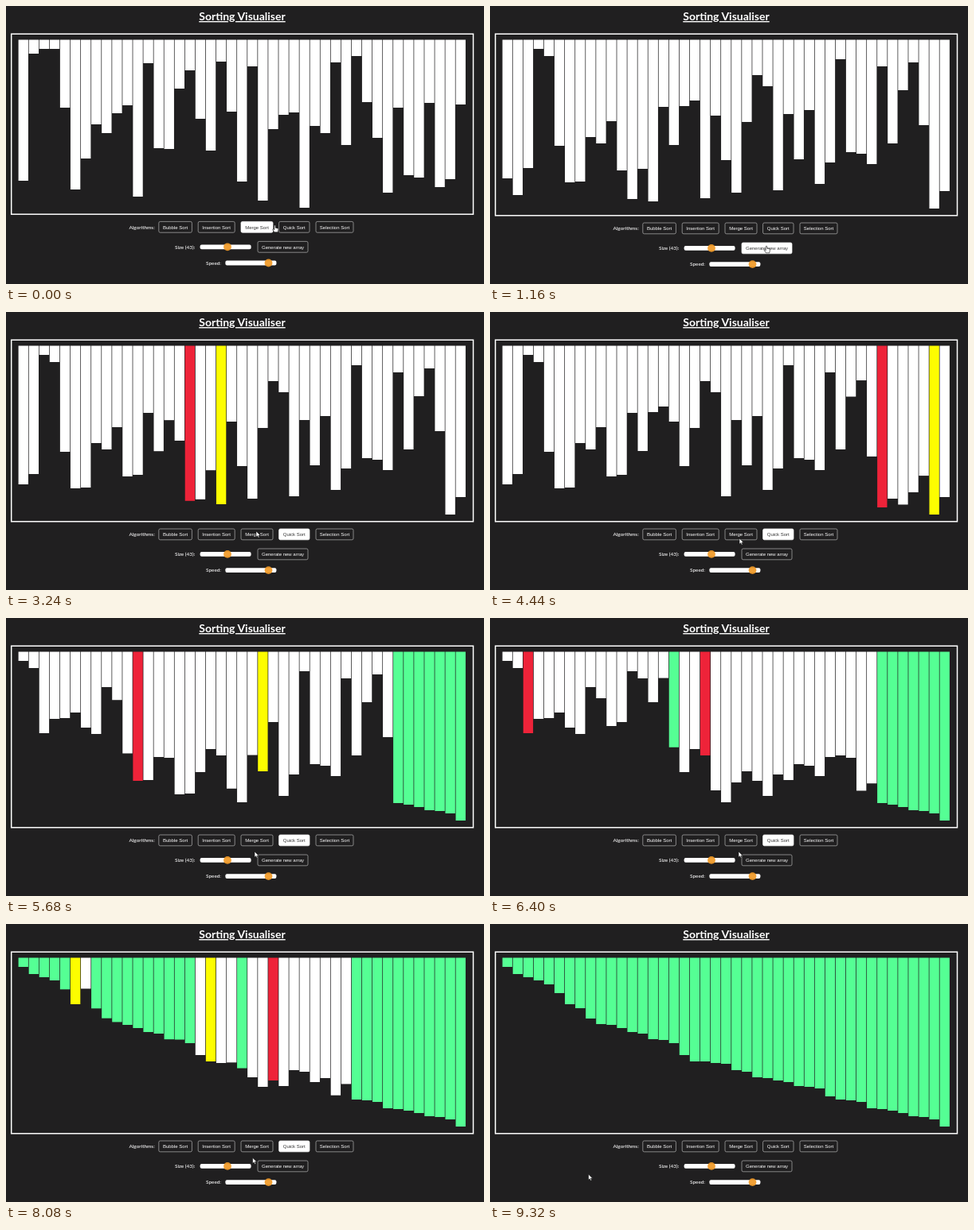
An HTML page for the animation above (9360 ms loop, 600 by 350 pixels).

```html
<!DOCTYPE html>
<html lang="en">
<head>
<meta charset="utf-8">
<title>Sorting Visualiser</title>
<style>
  html, body { margin: 0; width: 100%; height: 100%; overflow: hidden; background: #201f20; }
  svg { display: block; width: 600px; height: 350px; }
  text { fill: #fff; font: 500 6.4px Lato, "Open Sans", sans-serif; }
  .title { font-size: 14px; font-weight: 700; text-anchor: middle; text-decoration: underline; }
  .btn rect { fill: transparent; stroke: #b4b4b4; stroke-width: .7; }
  .btn text { font: 6px "Liberation Sans", Arial, sans-serif; text-anchor: middle; }
  .btn.on rect { fill: #fff; stroke: #fff; }
  .btn.on text { fill: #333; }
  .track { fill: #fff; }
  .thumb { fill: #f09a28; fill-opacity: .93; }
  #cursor path { fill: #fff; stroke: #111; stroke-width: .6; stroke-linejoin: round; }
</style>
</head>
<body>
<svg viewBox="0 0 600 350">
  <text class="title" x="296.5" y="18">Sorting Visualiser</text>
  <rect id="frame" x="6.7" y="35.2" width="579.8" height="227" fill="none" stroke="#fff" stroke-width="1.5"/>
  <g id="bars"></g>
  <g id="controls">
    <text x="154.5" y="280.5">Algorithms:</text>
    <text x="212" y="305.5">Size (43):</text>
    <text x="251" y="325.7">Speed:</text>
    <rect class="track" x="243.6" y="300.4" width="64" height="5.8" rx="2"/>
    <circle class="thumb" cx="278" cy="303.3" r="4.9"/>
    <rect class="track" x="275.4" y="320.6" width="64" height="5.8" rx="2"/>
    <circle class="thumb" cx="329.5" cy="323.5" r="4.9"/>
  </g>
  <g id="cursor">
    <path id="arrow" d="M0 0V7.2L1.7 5.7L2.9 8.2L4.1 7.6L3 5.2H5.3Z"/>
    <path id="hand" d="M-.8 .6Q0 -.5 .8 .6V3.2L3.8 3.9Q4.6 4.2 4.4 5.2L3.8 8.8H-.6L-2.8 5.6Q-2.9 4.6 -1.9 4.9L-.8 5.8Z"/>
  </g>
</svg>
<script>
const NS = "http://www.w3.org/2000/svg";
const $ = id => document.getElementById(id);
const LOOP = 9360, TOP = 42.5, GENERATE = 900, START = 2183;
const WHITE = "#fff", RED = "#ee2339", YELLOW = "#fdfd00", GREEN = "#55ff94";

// Bottom edge of each bar
const before = [220, 60, 54, 54, 128, 231, 192, 149, 160, 135, 125, 240, 72, 179, 180,
  104, 81, 142, 182, 70, 133, 221, 76, 245, 155, 137, 134, 254, 151, 160, 71, 175, 63,
  121, 166, 235, 128, 213, 216, 122, 228, 218, 124];
const values = [217, 238, 204, 54, 63, 176, 222, 221, 165, 173, 145, 207, 243, 205, 246,
  127, 175, 126, 119, 242, 138, 194, 235, 146, 87, 101, 232, 136, 193, 131, 224, 197, 67,
  184, 186, 199, 76, 173, 106, 71, 150, 255, 233];

function make(tag, attrs, parent) {
  const el = document.createElementNS(NS, tag);
  for (const k in attrs) el.setAttribute(k, attrs[k]);
  return parent.appendChild(el);
}

// CSS "ease": cubic-bezier(.25, .1, .25, 1)
function ease(x) {
  if (x <= 0) return 0;
  if (x >= 1) return 1;
  const curve = (a, b, s) => 3 * a * s * (1 - s) ** 2 + 3 * b * s * s * (1 - s) + s ** 3;
  let lo = 0, hi = 1;
  for (let k = 0; k < 18; k++) {
    const mid = (lo + hi) / 2;
    if (curve(.25, .25, mid) < x) lo = mid; else hi = mid;
  }
  return curve(.1, 1, lo);
}

const last = (track, t) => {
  let k = track.length - 1;
  while (k > 0 && track[k].t > t) k--;
  return track[k];
};

const bars = before.map((v, i) => ({
  el: make("rect", { x: 15.6 + 13.07 * i, y: TOP, width: 12.35 }, $("bars")),
  sizes: [{ t: -1000, from: v, to: v }],
  colors: [{ t: -1000, color: WHITE }]
}));

function bottomAt(bar, t) {
  const s = last(bar.sizes, t);
  return s.from + (s.to - s.from) * ease((t - s.t) / 200);
}
function resize(i, t, to) {
  bars[i].sizes.push({ t, from: bottomAt(bars[i], t), to });
}
function paint(i, t, color) {
  bars[i].colors.push({ t, color });
}
function swap(i, j, t) {
  if (i === j) return;
  [values[i], values[j]] = [values[j], values[i]];
  resize(i, t, values[i]);
  resize(j, t, values[j]);
}

// Start of the n-th comparison; the first pass runs a little slower
const stepTime = n => START + 54.6 * Math.min(n, 42) + 52.03 * Math.max(n - 42, 0);
let finish = 0;

// Both halves are sorted at the same time
function quickSort(lo, hi, n, lag) {
  if (lo > hi) return;
  const time = j => stepTime(n + j - lo) + lag;
  const end = time(hi);
  finish = Math.max(finish, end);
  if (lo === hi) return paint(lo, end, GREEN);
  let p = lo;
  for (let j = lo; j < hi; j++) {
    const t = time(j);
    if (j > lo) paint(j - 1, t, j - 1 === p ? RED : WHITE);
    paint(j, t, YELLOW);
    if (values[j] < values[hi]) {
      swap(j, p, t);
      paint(p, t, WHITE);
      paint(++p, t, RED);
    }
  }
  paint(hi - 1, end, WHITE);
  swap(p, hi, end);
  paint(p, end, GREEN);
  quickSort(lo, p - 1, n + hi - lo, lag);
  quickSort(p + 1, hi, n + hi - lo, 15);
}

values.forEach((v, i) => resize(i, GENERATE, v));
quickSort(0, values.length - 1, 0, 0);

const buttons = [
  ["Bubble Sort", 191.8, 41.6, 271.4], ["Insertion Sort", 241.2, 46, 271.4],
  ["Merge Sort", 295, 40, 271.4], ["Quick Sort", 342.6, 38.4, 271.4],
  ["Selection Sort", 389, 47, 271.4], ["Generate new array", 316, 63, 296.4]
].map(([label, x, w, y]) => {
  const el = make("g", { class: "btn" }, $("controls"));
  make("rect", { x, y, width: w, height: 13.8, rx: 1.8 }, el);
  make("text", { x: x + w / 2, y: y + 9.1 }, el).textContent = label;
  return { el, label, x, y, w };
});

// Pointer tip: time, x, y
const path = [[0, 337.5, 276], [40, 338, 276], [300, 412, 277], [380, 412, 279],
  [680, 347, 302], [1250, 347, 302], [1760, 360, 276], [2320, 360, 276],
  [2800, 314, 276], [3700, 314, 276], [4200, 313, 285], [4800, 313, 285],
  [5300, 312, 294], [8000, 312, 294], [9200, 123.5, 315], [LOOP, 123.5, 315]];

function pointerAt(t) {
  const k = path.findIndex(p => p[0] > t);
  const [t0, x0, y0] = path[k - 1], [t1, x1, y1] = path[k];
  const u = (t - t0) / (t1 - t0), s = u * u * (3 - 2 * u);
  return [x0 + (x1 - x0) * s, y0 + (y1 - y0) * s];
}

function draw(t) {
  for (const bar of bars) {
    bar.el.setAttribute("height", bottomAt(bar, t) - TOP);
    bar.el.setAttribute("fill", last(bar.colors, t).color);
  }
  const shift = 1.6 * ease((t - GENERATE) / 200);
  $("frame").setAttribute("height", 227 + shift);
  $("controls").setAttribute("transform", `translate(0 ${shift})`);

  const [x, y] = pointerAt(t);
  const running = t >= START && t < finish;
  let over = t < 70;
  for (const b of buttons) {
    const inside = x > b.x && x < b.x + b.w && y > b.y + shift && y < b.y + shift + 13.8;
    const hover = inside && !(t > 2320 && t < finish);
    over = over || hover;
    b.el.classList.toggle("on", hover ||
      (b.label === "Quick Sort" && running) || (b.label === "Merge Sort" && t < 70));
  }
  $("cursor").setAttribute("transform", `translate(${x} ${y})`);
  $("hand").style.display = over ? "" : "none";
  $("arrow").style.display = over ? "none" : "";
}

const begin = performance.now();
function tick() {
  draw((performance.now() - begin) % LOOP);
  requestAnimationFrame(tick);
}
tick();
</script>
</body>
</html>
```
